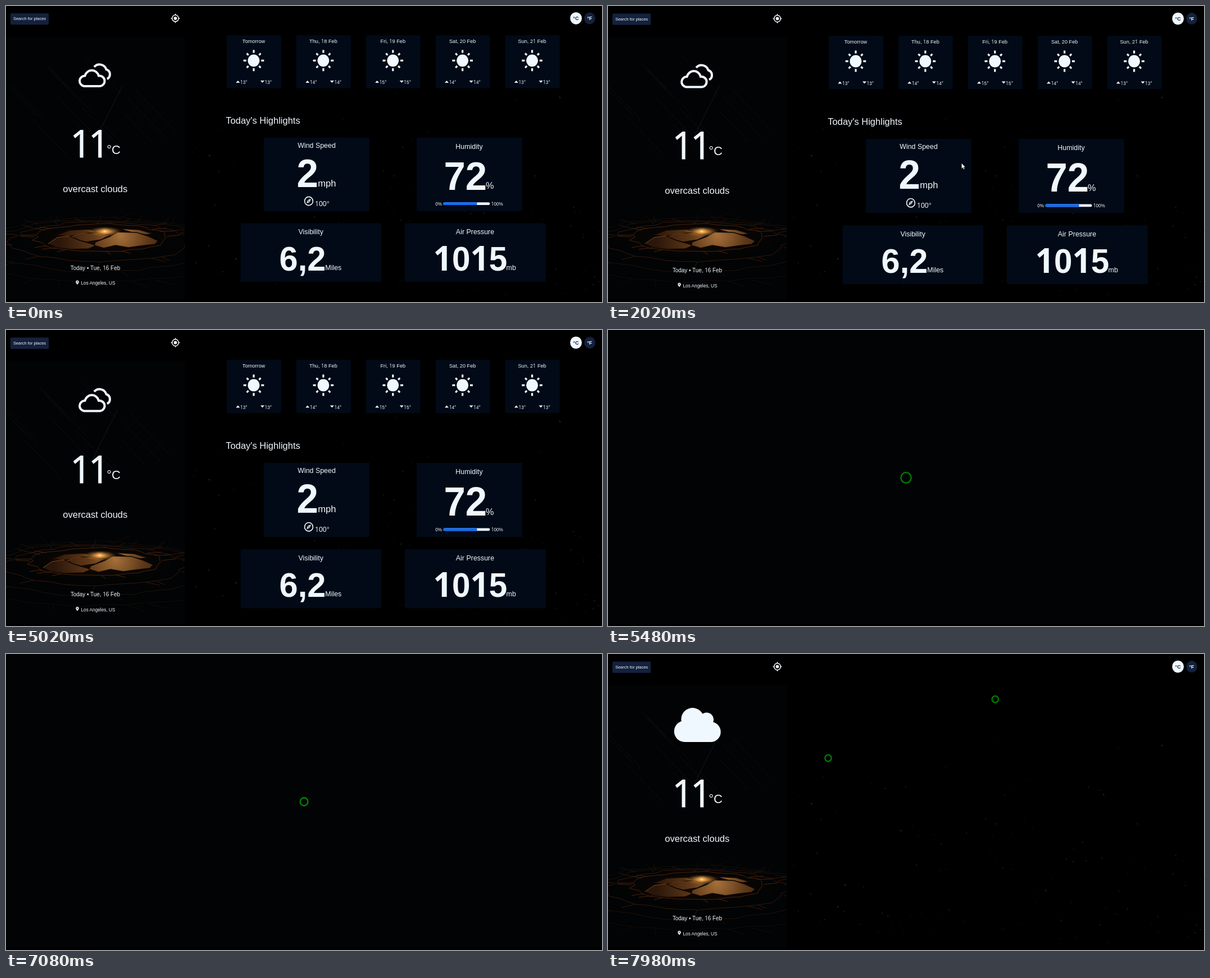
Animation of 1061 by 528 pixels, one loop 8 s. Source, as an HTML page:

```html
<!DOCTYPE html>
<html lang="en">
<head>
<meta charset="utf-8">
<title>Weather dashboard</title>
<style>
  html, body { margin: 0; width: 100%; height: 100%; overflow: hidden; background: #000; }
  svg { display: block; width: 1061px; height: 528px; }
  text { font-family: "Liberation Sans", Arial, sans-serif; fill: #f0f8ff; white-space: pre; }
  .one { font-family: "Open Sans", "Noto Sans", sans-serif; }
</style>
</head>
<body>
<svg id="stage" viewBox="0 0 1061 528" xmlns="http://www.w3.org/2000/svg">
  <defs>
    <radialGradient id="glow">
      <stop offset="0" stop-color="#fff0c0"/>
      <stop offset=".3" stop-color="#f0a850" stop-opacity=".8"/>
      <stop offset="1" stop-color="#b06820" stop-opacity="0"/>
    </radialGradient>
    <radialGradient id="ground">
      <stop offset="0" stop-color="#2c1407" stop-opacity=".6"/>
      <stop offset="1" stop-color="#0a0402" stop-opacity="0"/>
    </radialGradient>
    <radialGradient id="plate" gradientUnits="userSpaceOnUse" cx="195" cy="409" r="110">
      <stop offset="0" stop-color="#a5703a"/>
      <stop offset=".45" stop-color="#5e3818"/>
      <stop offset="1" stop-color="#2a160a"/>
    </radialGradient>
    <clipPath id="side"><rect width="318" height="524"/></clipPath>
  </defs>
  <rect width="1061" height="528"/>
  <g id="page">
    <g clip-path="url(#side)">
      <rect y="55" width="318" height="469" fill="#010304"/>
      <g id="photo"></g>
    </g>
    <g id="stars"></g>
    <g id="content"><g id="frame"></g><g id="outline"></g><g id="solid"></g><g id="details"></g></g>
    <path id="cursor" d="M629.5 280.5v9.6l2.2-2 1.5 3.3 1.5-.7-1.5-3.2h2.9z" fill="#fff" stroke="#222" stroke-width=".4"/>
  </g>
  <g id="loading"><rect width="1061" height="524" fill="#010305"/></g>
</svg>
<script>
const LOOP = 8000;
const INK = '#f0f8ff', NAVY = '#14213d', CARD = '#010a16';
const TALL = 1.04; // the whole interface is slightly taller than wide
const $ = id => document.getElementById(id);

function add(parent, tag, attrs) {
  const node = document.createElementNS('http://www.w3.org/2000/svg', tag);
  for (const key in attrs) node.setAttribute(key, attrs[key]);
  parent.appendChild(node);
  return node;
}

function rect(parent, x, y, width, height, fill, rx = 1.5) {
  return add(parent, 'rect', { x, y, width, height, fill, rx });
}

// The digit 1 is set in a face without a foot.
function label(parent, str, x, y, size, opts = {}) {
  const node = add(parent, 'text', {
    transform: `translate(${x} ${y}) scale(1 ${TALL})`, 'font-size': size,
    'text-anchor': opts.mid ? 'middle' : 'start', ...opts.attrs
  });
  for (const part of str.split(/(1)/).filter(Boolean)) {
    add(node, 'tspan', part === '1' ? { class: 'one' } : {}).textContent = part;
  }
}

const mid = (parent, str, x, y, size, attrs) => label(parent, str, x, y, size, { mid: true, attrs });
const bold = (parent, str, x, y, size) => label(parent, str, x, y, size, { attrs: { 'font-weight': 700 } });

function random(seed) {
  return () => (seed = (seed * 16807) % 2147483647) / 2147483647;
}

// Rings of cracked ground, wider and darker towards the viewer.
function drawCracks(g, rnd) {
  const colors = ['#4a220c', '#34180a', '#20110a', '#130c09'];
  colors.forEach((stroke, k) => {
    const top = 389 - 3.5 * k, bottom = 438 + 18 * k;
    const rx = 118 + 42 * k, ry = (bottom - top) / 2;
    const at = (a, grow) => `${160 + Math.cos(a) * rx * grow} ${top + ry + Math.sin(a) * ry * grow}`;
    const ring = [], spokes = [];
    for (let a = 0; a < 6.28; a += .12 + rnd() * .12) {
      ring.push(at(a, .94 + rnd() * .12));
      if (rnd() < .4) spokes.push(`M${at(a, 1)}L${at(a + (rnd() - .5) * .15, 1.22)}`);
    }
    add(g, 'path', { d: `M${ring.join('L')}Z${spokes.join('')}`, stroke, fill: 'none' });
  });
}

function drawPhoto(g) {
  const rnd = random(71);
  for (let i = 0; i < 14; i++) {
    const x = rnd() * 240 - 20, y = 70 + rnd() * 170, len = 30 + rnd() * 55;
    add(g, 'path', { d: `M${x} ${y}l${len} ${len * 1.05}`, stroke: '#07130f' });
  }
  add(g, 'path', { d: 'M198 143L155 229', stroke: '#0d2015' });
  add(g, 'ellipse', { cx: 163, cy: 415, rx: 165, ry: 42, fill: 'url(#ground)' });
  drawCracks(g, rnd);
  const plate = points => add(g, 'polygon', { points, fill: 'url(#plate)', stroke: '#120803', 'stroke-width': 1.5 });
  plate('80,409 104,400 140,398 152,403 128,407 103,411');
  plate('192,397 228,399 252,406 240,408 212,403');
  plate('66,424 82,413 104,410 122,418 152,427 138,433 105,434 80,431');
  plate('108,412 120,407 150,406 174,410 160,417 134,421 122,418');
  plate('150,421 176,411 190,403 224,404 245,411 262,419 256,425 230,428 209,431 186,427 165,432 148,427');
  add(g, 'path', { d: 'M108 412L120 407 150 406 174 410M66 424L82 413 104 410', stroke: '#8a4c1c', fill: 'none' });
  add(g, 'ellipse', { cx: 167, cy: 402.5, rx: 30, ry: 9, fill: 'url(#glow)' });
  add(g, 'ellipse', { cx: 167, cy: 402, rx: 12, ry: 7, fill: 'url(#glow)' });
}

function drawStars(g) {
  const rnd = random(19);
  for (let i = 0; i < 110; i++) {
    const y = 150 + 365 * Math.sqrt(rnd());
    rect(g, 330 + rnd() * 725, y, 1.4, 1.4, rnd() < .3 ? '#233c3c' : '#0f1a1b', 0);
  }
  for (const [x, y] of [[362, 267], [422, 412], [409, 451], [521, 315], [779, 422], [882, 251], [986, 163]]) {
    add(g, 'path', { d: `M${x - 1} ${y - 1}l2.5 2`, stroke: '#3c5453' });
  }
}

function drawFrame(g) {
  rect(g, 8, 13.5, 68, 20.3, NAVY);
  label(g, 'Search for places', 13, 26.1, 7.47);

  const aim = add(g, 'g', { transform: `translate(301.5 22.5) scale(1 ${TALL})`, stroke: INK, 'stroke-width': 1.5, fill: 'none' });
  add(aim, 'circle', { r: 5.7 });
  add(aim, 'circle', { r: 2.9, fill: INK, stroke: 'none' });
  add(aim, 'path', { d: 'M0-8V-5.5M0 8V5.5M-8 0H-5.5M8 0H5.5' });

  add(g, 'ellipse', { cx: 1014.7, cy: 22.5, rx: 10.4, ry: 10.8, fill: INK });
  add(g, 'ellipse', { cx: 1039.2, cy: 22.5, rx: 9.8, ry: 10.6, fill: NAVY });
  mid(g, '°C', 1014.6, 25.7, 8.9, { 'font-weight': 700, style: 'fill:' + NAVY });
  mid(g, '°F', 1039, 25.7, 8.9, { 'font-weight': 700 });

  label(g, '11', 114.2, 273, 65.5, { attrs: { 'letter-spacing': '-.07em', stroke: INK, 'stroke-width': .9 } });
  label(g, '°C', 179.3, 266.3, 22);
  mid(g, 'overcast clouds', 158.8, 334.8, 16.58);
  mid(g, 'Today • Tue, 16 Feb', 159, 474.9, 9.9);
  add(g, 'path', { d: 'M127 501.3c-1.8-2.3-2.7-3.5-2.7-4.7a2.7 2.8 0 0 1 5.4 0c0 1.2-.9 2.4-2.7 4.7z', fill: INK });
  add(g, 'circle', { cx: 127, cy: 496.5, r: .9 });
  label(g, 'Los Angeles, US', 133.5, 501.6, 8.25);
}

function drawClouds() {
  const line = { fill: 'none', stroke: INK, 'stroke-width': 4 };
  add($('outline'), 'path', { ...line, d: 'M139 144.5A9.3 9.3 0 0 1 140.5 126A12.7 13.5 0 0 1 165 126A9.3 9.3 0 0 1 167.5 144.5Z' });
  add($('outline'), 'path', { ...line, d: 'M157 110A12.5 12.5 0 0 1 178.5 114.5A9.3 9.3 0 0 1 180 131.6' });
  const g = $('solid');
  for (const [cx, cy, r] of [[136.7, 138, 19], [150.5, 116.3, 20.2], [175.5, 117, 12.5], [182.7, 139, 18]]) {
    add(g, 'circle', { cx, cy, r, fill: INK });
  }
  rect(g, 136, 116, 47, 41, INK, 0);
}

function drawForecast(g) {
  const days = [['Tomorrow', 13], ['Thu, 18 Feb', 14], ['Fri, 19 Feb', 15], ['Sat, 20 Feb', 14], ['Sun, 21 Feb', 13]];
  days.forEach(([day, temp], i) => {
    const x = 393 + i * 123.9;
    rect(g, x, 53, 97, 95.3, CARD);
    mid(g, day, x + 48, 67.4, 9.2);
    const sun = add(g, 'g', { transform: `translate(${x + 48} 98.5) scale(1 ${TALL})`, fill: INK });
    add(sun, 'circle', { r: 10.5 });
    for (let a = 0; a < 360; a += 45) {
      const ray = rect(sun, 13.3, -1.6, a % 90 ? 4.3 : 5, 3.2, INK, 0);
      ray.setAttribute('transform', `rotate(${a})`);
    }
    add(g, 'path', { d: `M${x + 16.3} 138.6h7l-3.5-4.2z`, fill: INK });
    label(g, temp + '°', x + 24, 140.8, 8.29);
    add(g, 'path', { d: `M${x + 60} 134.4h7l-3.5 4.2z`, fill: INK });
    label(g, temp + '°', x + 67.5, 140.8, 8.29);
  });
}

function drawHighlights(g) {
  label(g, "Today's Highlights", 391.3, 211.7, 16.5);
  rect(g, 459, 237, 188, 132, CARD);
  rect(g, 731, 237, 188, 132, CARD);
  rect(g, 417.5, 391, 250.5, 105.3, CARD);
  rect(g, 710, 391, 251, 105.3, CARD);

  mid(g, 'Wind Speed', 553, 255.3, 12.43);
  bold(g, '2', 517.5, 326, 69);
  label(g, 'mph', 555.3, 324.8, 16.58);
  const dial = add(g, 'g', { transform: `translate(539 351.2) scale(1 ${TALL})` });
  add(dial, 'circle', { r: 7.4, fill: 'none', stroke: INK, 'stroke-width': 1.6 });
  add(dial, 'path', { d: 'M4-4L1.6 1.6-4 4-1.6-1.6Z', fill: INK });
  add(dial, 'circle', { r: 1, fill: CARD });
  label(g, '100°', 550, 359.8, 12.3);

  mid(g, 'Humidity', 824.5, 257.3, 12.43);
  bold(g, '72', 779.5, 331, 69);
  label(g, '%', 854, 329.5, 16.3);
  label(g, '0%', 764.3, 359, 8.2);
  rect(g, 778.5, 353.6, 83, 4.7, '#eef2f8', 2.3);
  add(g, 'path', { d: 'M838.5 353.6H780.8a2.3 2.35 0 0 0 0 4.7H838.5z', fill: '#0d6efd' });
  label(g, '100%', 863.8, 359, 8.2);

  mid(g, 'Visibility', 542.7, 410.8, 12.43);
  bold(g, '6,2', 486.6, 476, 59.5);
  label(g, 'Miles', 568.3, 474.8, 12.43);
  mid(g, 'Air Pressure', 835, 410.8, 12.43);
  bold(g, '1015', 760.5, 476, 58.5);
  label(g, 'mb', 890.6, 474.8, 12.43);
}

function makeRings(parent, x, y) {
  const g = add(parent, 'g', {
    transform: `translate(${x} ${y}) scale(1.14 1.18)`, fill: 'none', stroke: '#008000', 'stroke-width': 2
  });
  const inner = add(g, 'circle', { r: 8 }), outer = add(g, 'circle', { r: 6 });
  return ms => {
    const phase = (Math.max(ms, 0) % 1500) / 250;
    inner.setAttribute('r', ms < 0 ? 8 : phase < 1 ? 6 - 5 * phase : phase);
    const grow = (ms - 1500) / 3000;
    outer.setAttribute('r', 6 + 16 * Math.max(grow, 0));
    outer.setAttribute('stroke-width', 2 * (1 - Math.max(grow, 0)));
    outer.setAttribute('stroke-opacity', grow < 0 ? 0 : 1 - grow);
  };
}

drawPhoto($('photo'));
drawStars($('stars'));
drawFrame($('frame'));
drawClouds();
drawForecast($('details'));
drawHighlights($('details'));
const mainRings = makeRings($('loading'), 530.6, 263.5);
const cardRings = [[689.3, 80.8], [392, 185.7]].map(([x, y]) => makeRings($('solid'), x, y));

const show = (id, on) => $(id).setAttribute('display', on ? 'inline' : 'none');

function render(t) {
  const loading = t >= 5480 && t < 7930, reloaded = t >= 7930;
  show('page', !loading);
  show('loading', loading);
  show('details', !reloaded);
  show('outline', !reloaded);
  show('solid', reloaded);
  show('cursor', t >= 2020 && t < 2730);

  // The window settles to its full height in three quick steps.
  const settle = [70, 110, 150].filter(at => t >= at).length / 3;
  $('content').setAttribute('transform', `translate(0 ${-.4 * (1 - settle)}) scale(1 ${.992 + .008 * settle})`);
  $('photo').setAttribute('transform', `translate(${9 * (1 - settle)} 0)`);

  mainRings(t - 5580);
  cardRings.forEach(draw => draw(t - 7930));
}

const start = performance.now();
function tick() {
  render((performance.now() - start) % LOOP);
  requestAnimationFrame(tick);
}
tick();
</script>
</body>
</html>
```
